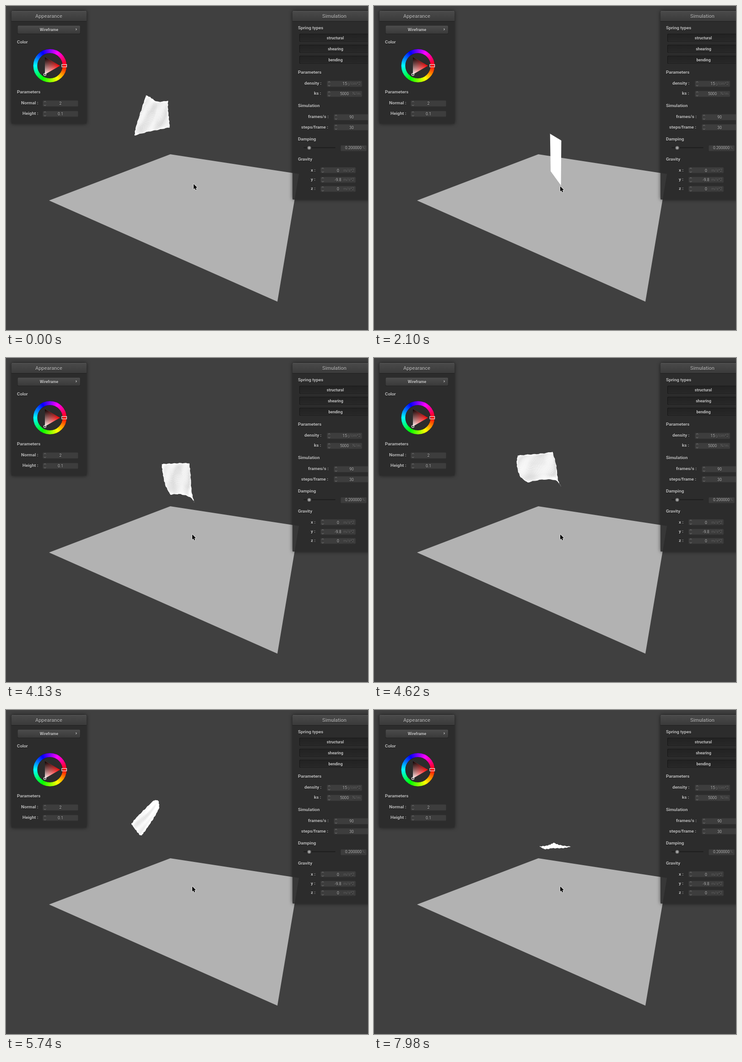
An HTML page with a canvas that plays this animation: 791x708 px, repeating every 8 s.

```html
<!DOCTYPE html>
<html lang="en">
<head>
<meta charset="utf-8">
<title>Cloth simulation</title>
<style>
html, body { margin: 0; width: 791px; height: 708px; overflow: hidden; background: #404040; }
canvas { position: absolute; left: 0; top: 0; }
#labels { position: absolute; left: 0; top: 0; width: 791px; height: 708px; overflow: hidden; }
span {
  position: absolute; white-space: pre; line-height: 0;
  font: 8.6px/0 Roboto, sans-serif; color: #b8b8b8; text-shadow: 0 1px 1px rgba(0,0,0,.55);
}
.c { transform: translateX(-50%); }
.r { transform: translateX(-100%); }
.title { font-size: 11px; font-weight: 500; color: #a8a8a8; }
.label { font-size: 9.8px; font-weight: 700; color: #bcbcbc; }
.button { font-weight: 700; color: #c4c4c4; }
.unit { color: #6c6c6c; }
</style>
</head>
<body>
<canvas id="stage" width="791" height="708"></canvas>
<div id="labels"></div>
<script>
const W = 791, H = 708, LOOP = 8000, STEP = 70;
const START = 2870, RESET = 1050, PAUSE = 560, LEAD = 5230;
const ctx = document.getElementById('stage').getContext('2d');
const clamp = (v, a = 0, b = 1) => Math.min(b, Math.max(a, v));
const mix = (a, b, k) => a + (b - a) * k;
const mixPt = (p, q, k) => [mix(p[0], q[0], k), mix(p[1], q[1], k)];

// ---------- text ----------
function text(str, x, y, cls, align = 'l') {
  const s = document.createElement('span');
  s.textContent = str;
  s.className = cls + ' ' + align;
  s.style.left = x + 'px';
  s.style.top = y + 'px';
  document.getElementById('labels').append(s);
}
const label = (s, x, y) => text(s, x, y, 'label');
const value = (s, x, y, align = 'c') => text(s, x, y, 'value', align);
const unit = (s, x, y) => text(s, x, y, 'unit');
const button = (s, x, y) => text(s, x, y, 'button', 'c');

text('Appearance', 93.5, 23, 'title', 'c');
button('Wireframe', 94, 52);
label('Color', 24, 79);
label('Parameters', 24, 188);
label('Normal :', 33, 212);
label('Height :', 36, 235);
value('2', 119, 213);
value('0.1', 119, 236);

text('Simulation', 717.5, 23, 'title', 'c');
label('Spring types', 638, 48);
button('structural', 719.5, 70);
button('shearing', 720, 94);
button('bending', 720, 118);
label('Parameters', 638, 145);
label('density :', 652, 169);
value('15', 745, 170, 'r');
unit('g/cm^2', 746, 170);
label('ks :', 673, 191);
value('5000', 749, 192, 'r');
unit('N/m', 757, 192);
label('Simulation', 638, 218);
label('frames/s :', 660, 242);
value('90', 755, 243);
label('steps/frame :', 645, 265);
value('30', 755, 266);
label('Damping', 638, 291);
value('0.200000', 777, 310, 'r');
unit('%', 778, 310);
label('Gravity', 638, 335);
[['x :', '0', 359], ['y :', '-9.8', 379], ['z :', '0', 399]].forEach(([name, v, y]) => {
  label(name, 666, y);
  value(v, 725.5, y + 1);
  unit('m/s^2', 737, y + 1);
});

// ---------- interface ----------
function poly(g, pts, fill) {
  g.beginPath();
  pts.forEach(p => g.lineTo(p[0], p[1]));
  g.closePath();
  g.fillStyle = fill;
  g.fill();
}

function shade(g, y, h, top, bottom) {
  const grad = g.createLinearGradient(0, y, 0, y + h);
  grad.addColorStop(0, top);
  grad.addColorStop(1, bottom);
  return grad;
}

function box(g, x, y, w, h, fill, r = 2) {
  g.beginPath();
  g.roundRect(x, y, w, h, r);
  g.fillStyle = fill;
  g.fill();
}

function panel(g, x, y, w, h) {
  // The shadow is clipped to the outside so the panel stays translucent.
  g.save();
  g.beginPath();
  g.rect(0, 0, W, H);
  g.roundRect(x, y, w, h, 2);
  g.clip('evenodd');
  g.shadowColor = 'rgba(0,0,0,.6)';
  g.shadowBlur = 8;
  box(g, x, y, w, h, '#000');
  g.restore();
  box(g, x, y, w, h, 'rgba(43,43,43,.9)');
  box(g, x, y, w, 22.5, shade(g, y, 22.5, '#4a4a4a', '#3a3a3a'));
  g.fillStyle = '#5a5a5a';
  g.fillRect(x + 1, y, w - 2, 1);
  g.fillStyle = '#1f1f1f';
  g.fillRect(x, y + 22, w, 1);
}

function chevron(g, x, y, dx, dy) {
  g.beginPath();
  g.moveTo(x - dy, y - dx);
  g.lineTo(x + dx, y + dy);
  g.lineTo(x + dy, y + dx);
  g.stroke();
}

function field(g, x, y, w, h = 14, spin = true) {
  box(g, x, y, w, h, '#3d3d3d');
  g.strokeStyle = 'rgba(20,20,20,.25)';
  g.lineWidth = 1;
  g.strokeRect(x + .5, y + .5, w - 1, h - 1);
  if (!spin) return;
  g.strokeStyle = '#858585';
  g.lineWidth = .9;
  g.beginPath();
  for (const d of [-1, 1]) {
    const cy = y + h / 2 + d * 3;
    g.moveTo(x + 3, cy);
    g.lineTo(x + 5.2, cy + d * 1.9);
    g.lineTo(x + 7.4, cy);
  }
  g.stroke();
}

function wheel(g, cx, cy) {
  g.save();
  g.translate(cx, cy);
  const hue = g.createConicGradient(0, 0, 0);
  for (let i = 0; i <= 6; i++) hue.addColorStop(i / 6, `hsl(${i * 60},100%,50%)`);
  g.strokeStyle = hue;
  g.lineWidth = 9;
  g.beginPath();
  g.arc(0, 0, 32, 0, Math.PI * 2);
  g.stroke();
  g.strokeStyle = 'rgba(0,0,0,.25)';
  g.lineWidth = 1;
  for (const r of [27.5, 36.5]) {
    g.beginPath();
    g.arc(0, 0, r, 0, Math.PI * 2);
    g.stroke();
  }

  const r = 22, ax = -r / 2, ay = r * .866;
  const tri = [[r, 0], [ax, ay], [ax, -ay]];
  const tint = g.createLinearGradient(r, 0, ax, ay);
  tint.addColorStop(0, '#f00');
  tint.addColorStop(1, '#fff');
  poly(g, tri, tint);
  const dark = g.createLinearGradient((r + ax) / 2, ay / 2, ax, -ay);
  dark.addColorStop(0, 'rgba(0,0,0,0)');
  dark.addColorStop(1, '#000');
  poly(g, tri, dark);

  g.strokeStyle = '#e8dede';
  g.lineWidth = 1.3;
  g.strokeRect(26, -2.8, 10.5, 5.4);
  g.beginPath();
  g.arc(ax, ay, 2.5, 0, Math.PI * 2);
  g.stroke();
  g.restore();
}

function drawUi(g) {
  panel(g, 12, 11, 164, 246);
  box(g, 25, 43, 137.5, 18.5, '#202020');
  box(g, 25.5, 43, 136.5, 17.5, shade(g, 43, 18, '#4c4c4c', '#393939'));
  g.strokeStyle = '#c0c0c0';
  g.lineWidth = 1;
  chevron(g, 152.5, 51, 1.8, 0);
  g.beginPath();
  g.moveTo(152.5, 49);
  g.lineTo(154.3, 51);
  g.lineTo(152.5, 53);
  g.stroke();
  wheel(g, 96, 130.5);
  field(g, 80, 206, 78);
  field(g, 80, 229, 78, 13.5);

  panel(g, 626, 11, 190, 412);
  for (const y of [61, 85, 109]) {
    box(g, 641, y - .5, 170, 19, '#3a3a3a');
    box(g, 641, y - .5, 170, 18.2, '#161616');
    box(g, 642, y + .5, 170, 16.5, shade(g, y, 17, '#222', '#282828'));
  }
  field(g, 701, 163, 77.5);
  field(g, 701, 185, 77.5);
  field(g, 716, 236, 90);
  field(g, 716, 258, 90);
  field(g, 731, 304, 57.5, 13.5, false);
  for (const y of [352, 373, 393]) field(g, 687, y, 77.5, 13.5);

  box(g, 650, 308.3, 70, 3.6, '#202020');
  box(g, 650, 311.3, 70, .8, '#333', 0);
  const dot = (r, fill) => {
    g.beginPath();
    g.arc(662.5, 310, r, 0, Math.PI * 2);
    g.fillStyle = fill;
    g.fill();
  };
  dot(5.6, '#1e1e1e');
  dot(4.8, '#505050');
  dot(2.9, '#a2a2a2');
}

const backdrop = document.createElement('canvas');
backdrop.width = W;
backdrop.height = H;
{
  const g = backdrop.getContext('2d');
  g.fillStyle = '#404040';
  g.fillRect(0, 0, W, H);
  poly(g, [[94, 425], [359, 324], [640, 367], [593, 646]], '#b2b2b2');
  drawUi(g);
}

// ---------- cloth ----------
// Each pose is a ring of 12 points: a corner and two edge points per side,
// clockwise from the top left corner.
const poses = [];
function pose(time, ...n) {
  const pts = [];
  for (let i = 0; i < n.length; i += 2) pts.push([n[i], n[i + 1]]);
  poses.push({ time, pts });
}
function flatPose(time, corners) {
  const pts = [];
  corners.forEach((c, i) => {
    const next = corners[(i + 1) % 4];
    for (let k = 0; k < 3; k++) pts.push(mixPt(c, next, k / 3));
  });
  poses.push({ time, pts });
}
flatPose(START, [[384.7, 279], [409.3, 294], [408.5, 392], [386, 361]]);
pose(3500, 375, 257, 383, 259, 394, 262, 407, 268, 402, 286, 402, 328,
  405, 363, 399, 359, 390, 346, 380, 340, 381, 310, 381, 282);
pose(4620, 314, 213, 338, 211, 365, 209, 390, 205, 398, 234, 402, 266,
  409, 281, 396, 267, 365, 266, 336, 272, 319, 258, 312, 232);
pose(LEAD, 306, 195, 316, 200, 331, 209, 354, 207, 354, 225, 356, 247,
  358, 265, 335, 270, 310, 275, 281, 283, 284, 264, 296, 226);
pose(5740, 321, 199, 327, 197, 333, 199, 335, 213, 326, 231, 313, 251,
  300, 270, 294, 274, 284, 263, 274, 249, 285, 235, 304, 216);
pose(6930, 370, 239, 380, 236, 392, 234, 391, 240, 380, 251, 366, 264,
  350, 268, 348, 277, 341, 276, 334, 272, 338, 258, 349, 241);
pose(7980, 393, 290, 402, 294, 417, 297, 431, 298, 420, 301, 405, 302,
  390, 302, 376, 304, 370, 303, 362, 298, 374, 297, 385, 294);

function slope(i, p, axis) {
  if (i === 0) return 0;
  const a = poses[i - 1], b = poses[Math.min(i + 1, poses.length - 1)];
  return (b.pts[p][axis] - a.pts[p][axis]) / (b.time - a.time);
}

function poseAt(time) {
  let i = 0;
  while (i < poses.length - 2 && time >= poses[i + 1].time) i++;
  const a = poses[i], b = poses[i + 1], span = b.time - a.time;
  const k = clamp((time - a.time) / span), k2 = k * k, k3 = k2 * k;
  return a.pts.map((pt, p) => pt.map((v, axis) =>
    v * (2 * k3 - 3 * k2 + 1) + b.pts[p][axis] * (3 * k2 - 2 * k3) +
    span * (slope(i, p, axis) * (k3 - 2 * k2 + k) + slope(i + 1, p, axis) * (k3 - k2))));
}

// Smooth curve through the four points of one side.
function side(pts, u) {
  const i = Math.min(2, Math.floor(u * 3)), k = u * 3 - i;
  const a = pts[Math.max(0, i - 1)], b = pts[i], c = pts[i + 1], d = pts[Math.min(3, i + 2)];
  return [0, 1].map(n => b[n] + .5 * k * (c[n] - a[n] +
    k * (2 * a[n] - 5 * b[n] + 4 * c[n] - d[n] + k * (3 * (b[n] - c[n]) + d[n] - a[n]))));
}

function drawCloth(phase) {
  const ring = poseAt(phase);
  const top = ring.slice(0, 4), right = ring.slice(3, 7);
  const bottom = ring.slice(6, 10), left = [...ring.slice(9), ring[0]];
  const rough = clamp((phase - START) / 500);

  const edge = [];
  [top, right, bottom, left].forEach((s, n) => {
    for (let i = 0; i < 20; i++) {
      const q = side(s, i / 20), w = i ? rough * .6 : 0;
      edge.push([q[0] + w * Math.sin(i * 2.3 + n * 5), q[1] + w * Math.sin(i * 1.7 + n * 3 + 1)]);
    }
  });
  poly(ctx, edge, '#fff');
  if (!rough) return;

  // Gaps of the wireframe show where the mesh is spread wide.
  const N = 34, grid = [];
  const [A, B, C, D] = [ring[0], ring[3], ring[6], ring[9]];
  for (let j = 0; j <= N; j++) {
    const v = j / N, l = side(left, 1 - v), r = side(right, v);
    const row = [];
    for (let i = 0; i <= N; i++) {
      const u = i / N, t = side(top, u), b = side(bottom, 1 - u);
      row.push([0, 1].map(n => mix(t[n], b[n], v) + mix(l[n], r[n], u) -
        mix(mix(A[n], B[n], u), mix(D[n], C[n], u), v) +
        .5 * Math.sin(u * 19 + v * 8 + n * 2)));
    }
    grid.push(row);
  }
  ctx.fillStyle = '#6c6c6c';
  for (let j = 1; j < N - 1; j++) for (let i = 1; i < N - 1; i++) {
    const p = grid[j][i], q = grid[j][i + 1], s = grid[j + 1][i];
    const area = Math.abs((q[0] - p[0]) * (s[1] - p[1]) - (q[1] - p[1]) * (s[0] - p[0]));
    const fold = .8 + .35 * Math.sin(i * .35 + j * .22);
    const alpha = clamp((area - 1.9) / 3.2, 0, .8) * fold * rough;
    if (alpha < .03) continue;
    ctx.globalAlpha = alpha;
    ctx.fillRect((q[0] + s[0]) / 2 - .55, (q[1] + s[1]) / 2 - .5, 1.1, 1);
  }
  ctx.globalAlpha = 1;
}

// ---------- pointer ----------
const arrow = [[0, 0], [0, 11.2], [2.6, 8.9], [4.3, 12.9], [6.2, 12.1], [4.5, 8.2], [7.9, 8]];
function drawPointer(x, y) {
  ctx.save();
  ctx.translate(x, y);
  ctx.lineJoin = 'round';
  ctx.strokeStyle = '#e4e4e4';
  ctx.lineWidth = 1.8;
  ctx.beginPath();
  arrow.forEach(p => ctx.lineTo(p[0], p[1]));
  ctx.closePath();
  ctx.stroke();
  ctx.fillStyle = '#000';
  ctx.fill();
  ctx.restore();
}

function draw(t) {
  ctx.drawImage(backdrop, 0, 0);
  drawCloth(t < RESET ? LEAD + Math.min(t, PAUSE) : Math.max(t, START));
  const down = clamp((t - RESET) / 210), up = clamp((t - 2100) / 280);
  drawPointer(410 - 3 * down, 389 + 5 * down - 8.5 * up);
}

const began = performance.now();
function tick(now) {
  const t = Math.max(0, now - began) % LOOP;
  draw(Math.floor(t / STEP) * STEP);
  requestAnimationFrame(tick);
}
draw(0);
requestAnimationFrame(tick);
</script>
</body>
</html>
```
